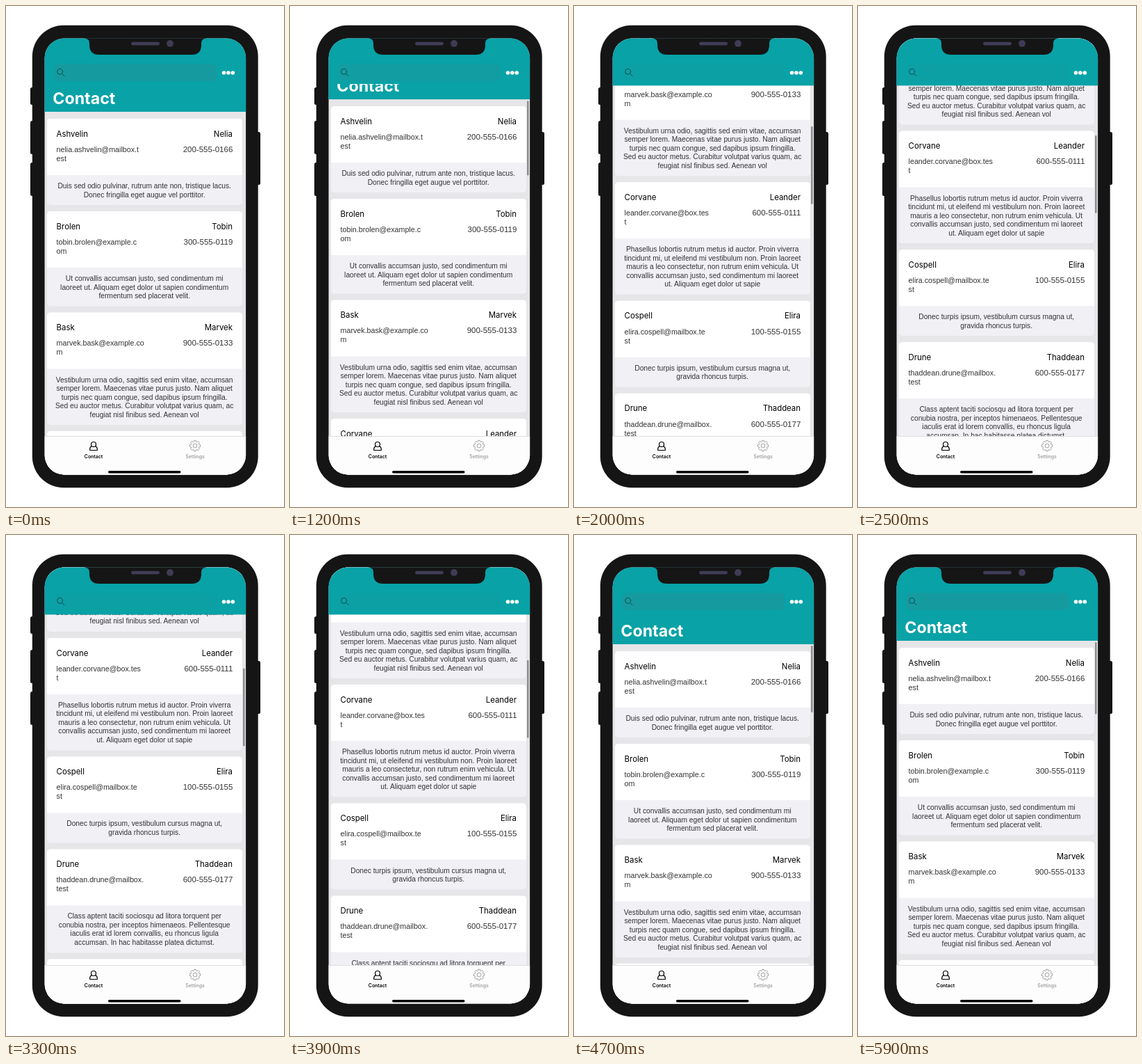
Animation, 400 px wide and 720 px high, one loop 6 s. Source, as an HTML page:

```html
<!DOCTYPE html>
<html lang="en">
<head>
<meta charset="utf-8">
<title>Contact list</title>
<style>
html, body { margin: 0; width: 100%; height: 100%; overflow: hidden; background: #fff; }
svg { display: block; width: 400px; height: 720px; }
.name { font: 400 11.4px Inter, sans-serif; fill: #000; }
.mail { font: 10.7px "Liberation Sans", Arial, sans-serif; fill: #333; }
.phone { font: 11.5px "Liberation Sans", Arial, sans-serif; fill: #333; }
.note { font: 10.25px "Liberation Sans", Arial, sans-serif; fill: #333336; text-anchor: middle; }
.title { font: 700 23.2px Inter, sans-serif; fill: #fff; }
.tab { font: 600 6.9px Inter, sans-serif; text-anchor: middle; }
.end { text-anchor: end; }
</style>
</head>
<body>
<svg viewBox="0 0 400 720">
  <defs>
    <clipPath id="screen"><rect x="55.6" y="46.6" width="289.5" height="626.8" rx="28"/></clipPath>
    <clipPath id="below"><rect x="55" y="112" width="291" height="60"/></clipPath>
  </defs>

  <g fill="#151515">
    <rect x="35" y="117" width="8" height="25" rx="2.5"/>
    <rect x="35" y="165" width="8" height="48" rx="2.5"/>
    <rect x="35" y="225" width="8" height="48" rx="2.5"/>
    <rect x="357" y="181" width="9" height="76" rx="2.5"/>
    <rect x="37.8" y="27.7" width="324.9" height="664.6" rx="45"/>
  </g>

  <g clip-path="url(#screen)">
    <rect x="55" y="46" width="291" height="628" fill="#e6e5e8"/>
    <g id="list"></g>

    <rect id="header" x="55" y="46" width="291" fill="#08a2a7"/>
    <rect id="field" x="69" y="83" width="234" height="25" rx="7" fill="#159b9f"/>
    <g fill="none" stroke="#174d50" stroke-width="1" stroke-linecap="round">
      <circle cx="77.6" cy="94.3" r="4"/>
      <path d="M80.6 97.3L84 100.7"/>
    </g>
    <g fill="#fff">
      <circle cx="313.5" cy="96" r="2.8"/>
      <circle cx="319.9" cy="96" r="2.8"/>
      <circle cx="326.3" cy="96" r="2.8"/>
    </g>
    <g clip-path="url(#below)"><text id="title" class="title" x="67.3">Contact</text></g>

    <rect id="bar" x="341" width="2.6" rx="1.3" fill="#77777a" fill-opacity=".8"/>

    <rect x="55" y="618" width="291" height="56" fill="#fdfdfd"/>
    <rect x="55" y="618" width="291" height=".7" fill="#d2d2d5"/>
    <g fill="none" stroke="#000" stroke-width="1.2" stroke-linejoin="round">
      <circle cx="126" cy="630" r="3.5"/>
      <path d="M123.6 632.6C121.7 633.2 120.7 634.8 120.7 637V638.5H131.3V637C131.3 634.8 130.3 633.2 128.4 632.6"/>
    </g>
    <g fill="none" stroke="#97979a" stroke-width=".9" stroke-linejoin="round">
      <path id="gear"/>
      <circle cx="272" cy="632" r="2.9"/>
    </g>
    <text class="tab" x="126" y="650.3" fill="#000">Contact</text>
    <text class="tab" x="272" y="650.3" fill="#a0a0a3">Settings</text>
    <rect x="147" y="668" width="104.5" height="3.6" rx="1.8" fill="#000"/>
  </g>

  <path d="M112 46.3Q120 47 120 53V56Q120 70 134 70H267Q281 70 281 56V53Q281 47 289 46.3Z" fill="#151515"/>
  <rect x="180" y="51.7" width="41" height="4.8" rx="2.4" fill="#3f3d56"/>
  <circle cx="236" cy="54" r="4.9" fill="#3f3d56"/>
</svg>

<script>
const contacts = [
  ["Ashvelin", "Nelia", ["nelia.ashvelin@mailbox.t", "est"], "200-555-0166",
    ["Duis sed odio pulvinar, rutrum ante non, tristique lacus.",
     "Donec fringilla eget augue vel porttitor."]],
  ["Brolen", "Tobin", ["tobin.brolen@example.c", "om"], "300-555-0119",
    ["Ut convallis accumsan justo, sed condimentum mi",
     "laoreet ut. Aliquam eget dolor ut sapien condimentum",
     "fermentum sed placerat velit."]],
  ["Bask", "Marvek", ["marvek.bask@example.co", "m"], "900-555-0133",
    ["Vestibulum urna odio, sagittis sed enim vitae, accumsan",
     "semper lorem. Maecenas vitae purus justo. Nam aliquet",
     "turpis nec quam congue, sed dapibus ipsum fringilla.",
     "Sed eu auctor metus. Curabitur volutpat varius quam, ac",
     "feugiat nisl finibus sed. Aenean vol"]],
  ["Corvane", "Leander", ["leander.corvane@box.tes", "t"], "600-555-0111",
    ["Phasellus lobortis rutrum metus id auctor. Proin viverra",
     "tincidunt mi, ut eleifend mi vestibulum non. Proin laoreet",
     "mauris a leo consectetur, non rutrum enim vehicula. Ut",
     "convallis accumsan justo, sed condimentum mi laoreet",
     "ut. Aliquam eget dolor ut sapie"]],
  ["Cospell", "Elira", ["elira.cospell@mailbox.te", "st"], "100-555-0155",
    ["Donec turpis ipsum, vestibulum cursus magna ut,",
     "gravida rhoncus turpis."]],
  ["Drune", "Thaddean", ["thaddean.drune@mailbox.", "test"], "600-555-0177",
    ["Class aptent taciti sociosqu ad litora torquent per",
     "conubia nostra, per inceptos himenaeos. Pellentesque",
     "iaculis erat id lorem convallis, eu rhoncus ligula",
     "accumsan. In hac habitasse platea dictumst."]],
  ["", "", [], "", ["", ""]]
];

const $ = id => document.getElementById(id);
const set = (el, attrs) => { for (const k in attrs) el.setAttribute(k, attrs[k]); };
const add = (parent, tag, attrs, text = "") => {
  const el = document.createElementNS("http://www.w3.org/2000/svg", tag);
  set(el, attrs);
  el.textContent = text;
  parent.append(el);
  return el;
};

const LINE = 12.5, TOP_H = 81;
let cardTop = 162;
for (const [last, first, mail, phone, note] of contacts) {
  const g = add($("list"), "g", { transform: `translate(0 ${cardTop})` });
  const h = TOP_H + 18 + LINE * note.length;
  const text = (cls, x, y, s) => add(g, "text", { class: cls, x, y }, s);
  add(g, "rect", { x: 59, y: 0, width: 281, height: h, rx: 5, fill: "#f1f0f5" });
  add(g, "path", { d: `M59 ${TOP_H}V5q0-5 5-5H335q5 0 5 5V${TOP_H}z`, fill: "#fff" });
  text("name", 72.6, 25.6, last);
  text("name end", 326, 25.6, first);
  mail.forEach((s, i) => text("mail", 72.6, 47.8 + 13 * i, s));
  text("phone end", 326.3, 47.8, phone);
  note.forEach((s, i) => text("note", 199.2, 100 + LINE * i, s));
  cardTop += h + 9;
}

// Eight-toothed gear outline
const teeth = [];
for (let i = 0; i < 8; i++)
  for (const [turn, r] of [[-.3, 6], [-.17, 7.8], [.17, 7.8], [.3, 6]]) {
    const a = i * Math.PI / 4 + turn;
    teeth.push(`${(272 + r * Math.cos(a)).toFixed(2)} ${(632 + r * Math.sin(a)).toFixed(2)}`);
  }
set($("gear"), { d: `M${teeth.join("L")}Z` });

// Pull back to the top, one value per 100 ms from 3700 on
const pull = [461, 437, 396, 337, 264, 191, 125, 66, 16, -12, -5, -2.5, -1.2, -.5, 0];

function scrollAt(t) {
  if (t < 1200) return 0;
  if (t < 1500) return 143 * ((t - 1100) / 400) ** 1.5;
  if (t < 3700) return 470 - 327 * Math.exp((1500 - t) / 468);
  return pull[Math.min((t - 3700) / 100, pull.length - 1)];
}

const OPEN = 152, SHUT = 114.4;

function draw() {
  const t = Math.floor(performance.now() % 6000 / 100) * 100;
  const s = scrollAt(t);
  const bottom = Math.max(SHUT, OPEN - s);
  const open = Math.min(1, (bottom - SHUT) / (OPEN - SHUT));
  set($("list"), { transform: `translate(0 ${-s.toFixed(2)})` });
  set($("header"), { height: bottom - 46 });
  set($("field"), { opacity: .3 + .7 * open });
  set($("title"), { y: 141 - s });
  set($("bar"), {
    y: bottom + 2 + .1765 * Math.max(0, s - 37),
    height: .2222 * (618 - bottom) + 1.3 * Math.min(0, s),
    visibility: t < 1200 ? "hidden" : "visible"
  });
  requestAnimationFrame(draw);
}
draw();
</script>
</body>
</html>
```
